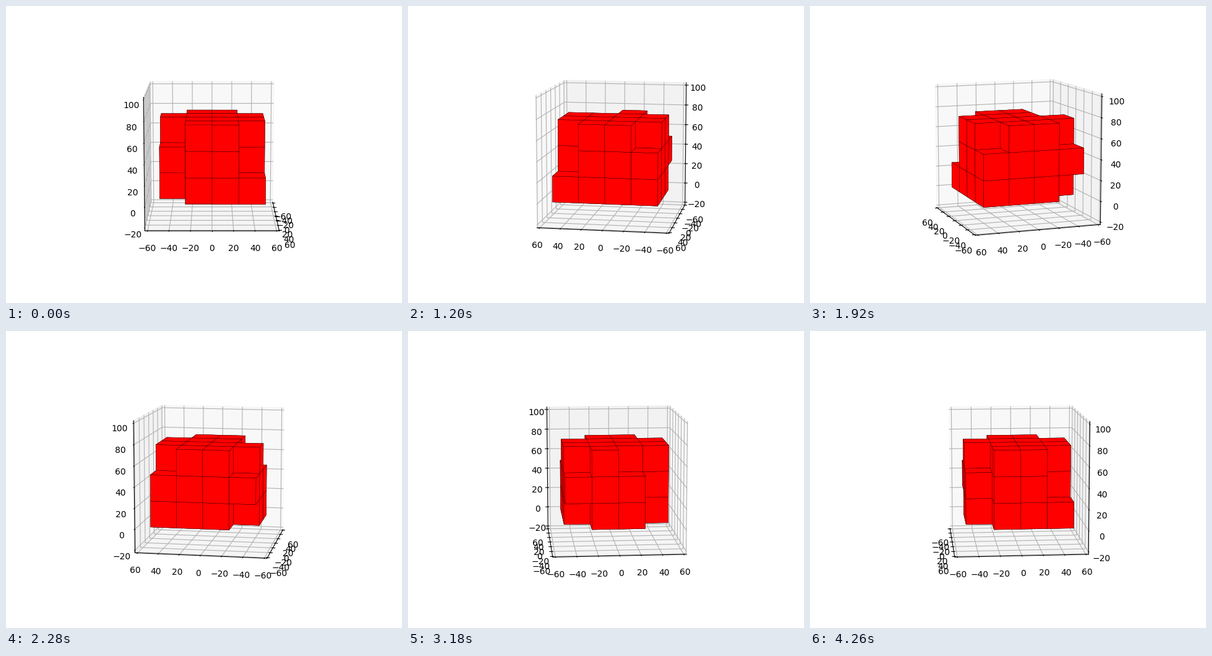
A matplotlib script that plays this animation: 640 px wide and 480 px high, repeating every 4320 ms.

```python
import numpy as np
import matplotlib.pyplot as plt
from matplotlib.animation import FuncAnimation
from mpl_toolkits.mplot3d.art3d import Poly3DCollection

SIZE = 25
STEP = 5
ORIGIN = np.array([-50, -50, 0])


def build_solid():
    """4 x 4 x 3 block with some cells taken out of its corners."""
    solid = np.ones((4, 4, 3), bool)
    solid[3, 0, :] = False
    solid[0, 0, [0, 2]] = False
    solid[3, 3, 1:] = False
    solid[0, 3, 2] = False
    solid[2, 0, 2] = False
    return solid


def outer_faces(solid):
    """Square faces between a filled cell and an empty one."""
    padded = np.pad(solid, 1)
    faces = []
    for cell in np.argwhere(solid):
        for axis in range(3):
            u, v = np.delete(np.eye(3, dtype=int), axis, axis=0)
            normal = np.eye(3, dtype=int)[axis]
            for side in (0, 1):
                if padded[tuple(cell + 1 + normal * (2 * side - 1))]:
                    continue
                corner = cell + normal * side
                quad = np.array([corner, corner + u, corner + u + v, corner + v])
                faces.append(ORIGIN + SIZE * quad)
    return faces


fig = plt.figure(figsize=(6.4, 4.8), dpi=100)
ax = fig.add_subplot(projection="3d")
ax.add_collection3d(Poly3DCollection(
    outer_faces(build_solid()), facecolors="red", edgecolors="black", linewidths=0.25))

flat_ticks = np.arange(-60, 61, 20)
ax.set(xticks=flat_ticks, yticks=flat_ticks, zticks=flat_ticks + 40)
ax.set(xlim=(-62.5, 62.5), ylim=(-62.5, 62.5), zlim=(-22.5, 102.5))
ax.set_box_aspect((1, 1, 1), zoom=np.sqrt(3) / 1.8294640721620434)


def update(i):
    azim = i * STEP
    # A tiny nudge settles which wall shows when the view is square on.
    if azim % 90 == 0:
        azim += 1e-4 if azim in (0, 270) else -1e-4
    ax.view_init(elev=10, azim=azim)
    return []


anim = FuncAnimation(fig, update, frames=360 // STEP, interval=60,
                     repeat=True, repeat_delay=0, blit=False)
plt.show()
```
